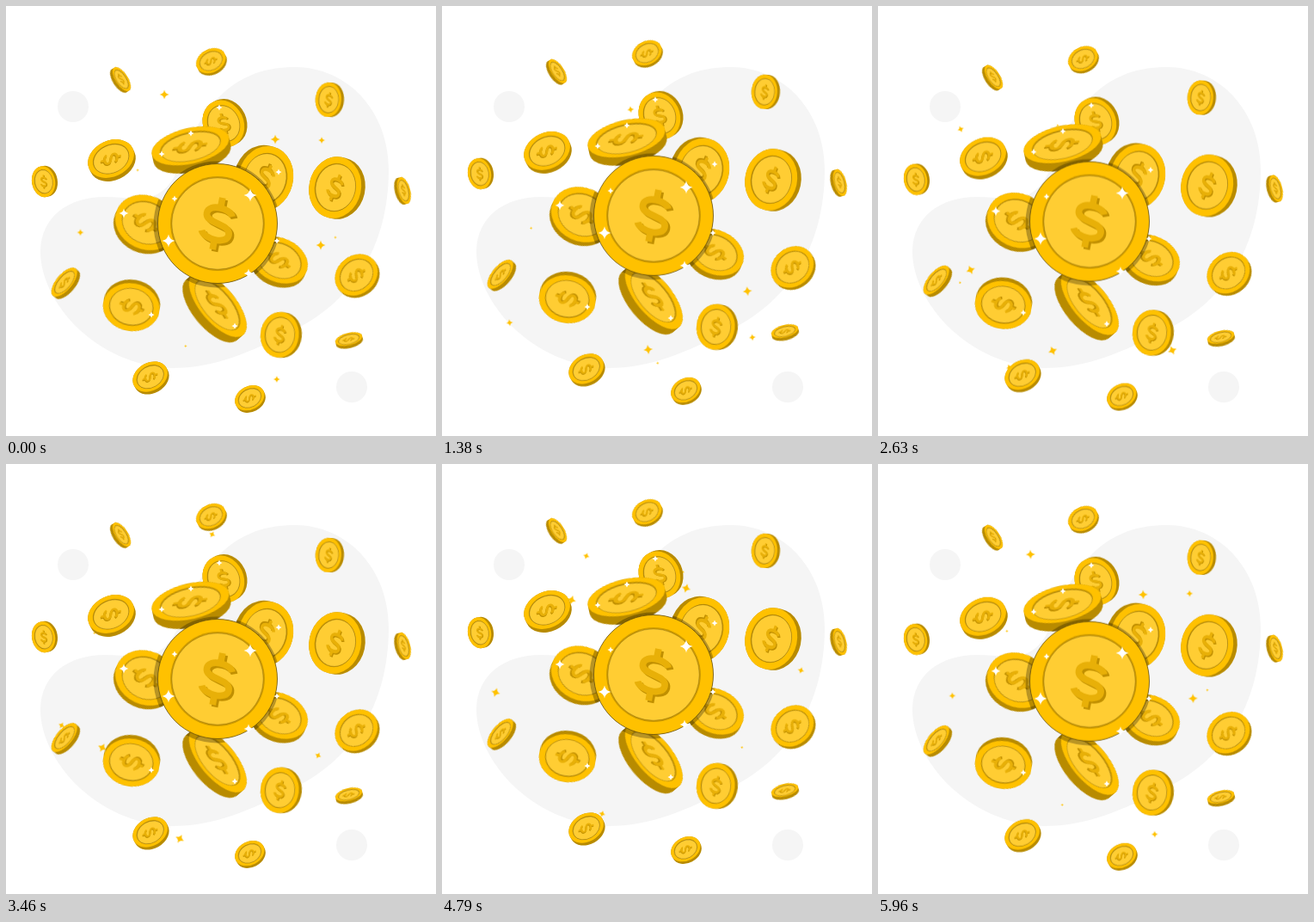
Recreate the animation shown at these times as an HTML page. Size 500 px wide and 500 px high, loop 6 s.

```html
<!DOCTYPE html>
<html lang="en">
<head>
<meta charset="utf-8">
<title>Floating coins</title>
<style>
  html, body { margin: 0; width: 100%; height: 100%; overflow: hidden; background: #fff; }
  svg { display: block; width: 100%; height: 100%; }
  #stars { fill: #ffc100; transform-origin: 234px 267.2px; animation: spin 6s linear infinite; }
  #coins { animation: float 1.5s linear infinite alternate; }
  @keyframes float { to { transform: translateY(-10px); } }
  @keyframes spin { to { transform: rotate(360deg); } }
</style>
</head>
<body>
<svg viewBox="0 0 500 500">
  <defs>
    <path id="star" d="M0-1Q.16-.16 1 0Q.16.16 0 1Q-.16.16-1 0Q-.16-.16 0-1Z"/>
    <path id="dollar" fill="none" stroke-width="11"
      d="M22-16C17-29-21-32-21-14C-21 4 22-4 22 15C22 33-18 30-24 16M0-44V-26M0 26V44"/>
    <clipPath id="bodies"></clipPath>
  </defs>
  <g fill="#f5f5f5">
    <path d="M335 71C399 71 445 124 445 190C445 282 402 343 335 377C283 403 243 421 193 421C105 418 40 345 40 285C41 245 72 222 115 222C150 222 180 235 200 190C222 130 255 71 335 71Z"/>
    <circle cx="78" cy="117" r="18"/>
    <circle cx="402" cy="443" r="18"/>
  </g>
  <g id="stars"></g>
  <g id="coins"></g>
</svg>
<script>
  const byId = id => document.getElementById(id);
  const GOLD = '#ffc100', LIGHT = '#ffcd33', EDGE = '#b88b00', RIM = '#cc9a00', INK = '#3a3010';

  const scatter = (size, points) => points.map(([x, y]) =>
    `<use href="#star" transform="translate(${x} ${y}) scale(${size})"/>`).join('');

  // Each coin lies in its own frame: long axis on y, visible edge towards +x.
  // The flatter it looks, the more of its edge shows.
  function makeCoin(ratio, [x, y, r, tilt]) {
    const w = r * ratio, t = 0.24 * r * Math.sqrt(1 - ratio * ratio), h = t / 2;
    const place = `transform="translate(${x} ${y}) rotate(${tilt})"`;
    const disc = (k, dx, color, extra = '') =>
      `<ellipse cx="${dx - h}" rx="${w * k}" ry="${r * k}" fill="${color}" ${extra}/>`;
    const sign = (shift, color) => `<use href="#dollar" stroke="${color}"
      transform="translate(${shift - h} ${shift}) scale(${w / 100} ${r / 100}) rotate(11)"/>`;
    const body = `d="M${-h} ${-r}H${h}A${w} ${r} 0 0 1 ${h} ${r}H${-h}A${w} ${r} 0 0 1 ${-h} ${-r}Z"`;
    const depth = r * 0.035;
    return {
      outline: `<path ${body} ${place}/>`,
      picture: `<g ${place}><path ${body} fill="${EDGE}"/>` +
        disc(1, 0, GOLD) + disc(0.79, 0, RIM) +
        disc(0.765, t * 0.12, LIGHT, `stroke="${INK}" stroke-width=".4" stroke-opacity=".65"`) +
        sign(depth, '#c08f00') + sign(0, '#e8b008') + '</g>'
    };
  }

  // x, y, radius, direction of the edge; grouped by width to height
  const groups = [
    [0.84, [
      [254.5, 136, 28, -25], [299.5, 200, 38, 194], [385, 211.5, 36, 12], [162, 254, 37, 115],
      [408.5, 314, 26.5, 50], [146, 348, 33, 280], [320, 382.5, 26.5, 6]]],
    [0.75, [
      [239, 65, 18, 62], [376.5, 109, 20, 4], [123, 179.5, 28, 65], [45, 204, 18, -10],
      [317, 298, 34, 115], [168.5, 432.5, 21.5, 60], [284, 457, 18, 62]]],
    [0.45, [
      [133, 86, 16, 147], [215.5, 167.5, 46, 77], [461, 215, 16, 165],
      [69.5, 322.5, 20.5, 40], [242.5, 350.5, 46, 140], [399, 389, 16, 76]]]
  ];
  const coins = groups.flatMap(([ratio, list]) => list.map(spec => makeCoin(ratio, spec)));
  const main = makeCoin(1, [246, 253, 69.5, 0]);

  byId('bodies').innerHTML = coins.map(c => c.outline).join('');
  byId('coins').innerHTML =
    coins.map(c => c.picture).join('') +
    '<circle cx="245" cy="254" r="73.5" opacity=".28" clip-path="url(#bodies)"/>' +
    main.picture +
    `<circle cx="246" cy="253" r="69.5" fill="none" stroke="${INK}" stroke-width=".6"/>` +
    '<g fill="#fff">' +
    scatter(7.5, [[284, 220], [189, 273]]) +
    scatter(5.5, [[282, 311], [137, 241]]) +
    scatter(3.6, [[196, 224], [181, 172], [215, 148], [248, 118],
      [317, 193], [315, 273], [169, 359], [266, 372]]) + '</g>';

  byId('stars').innerHTML =
    scatter(5.5, [[184, 103], [313, 155], [366, 278]]) +
    scatter(4, [[367, 156], [86.5, 263.5], [315, 434]]) +
    scatter(1.6, [[383, 269], [153, 191], [209, 395.5]]);
</script>
</body>
</html>
```
